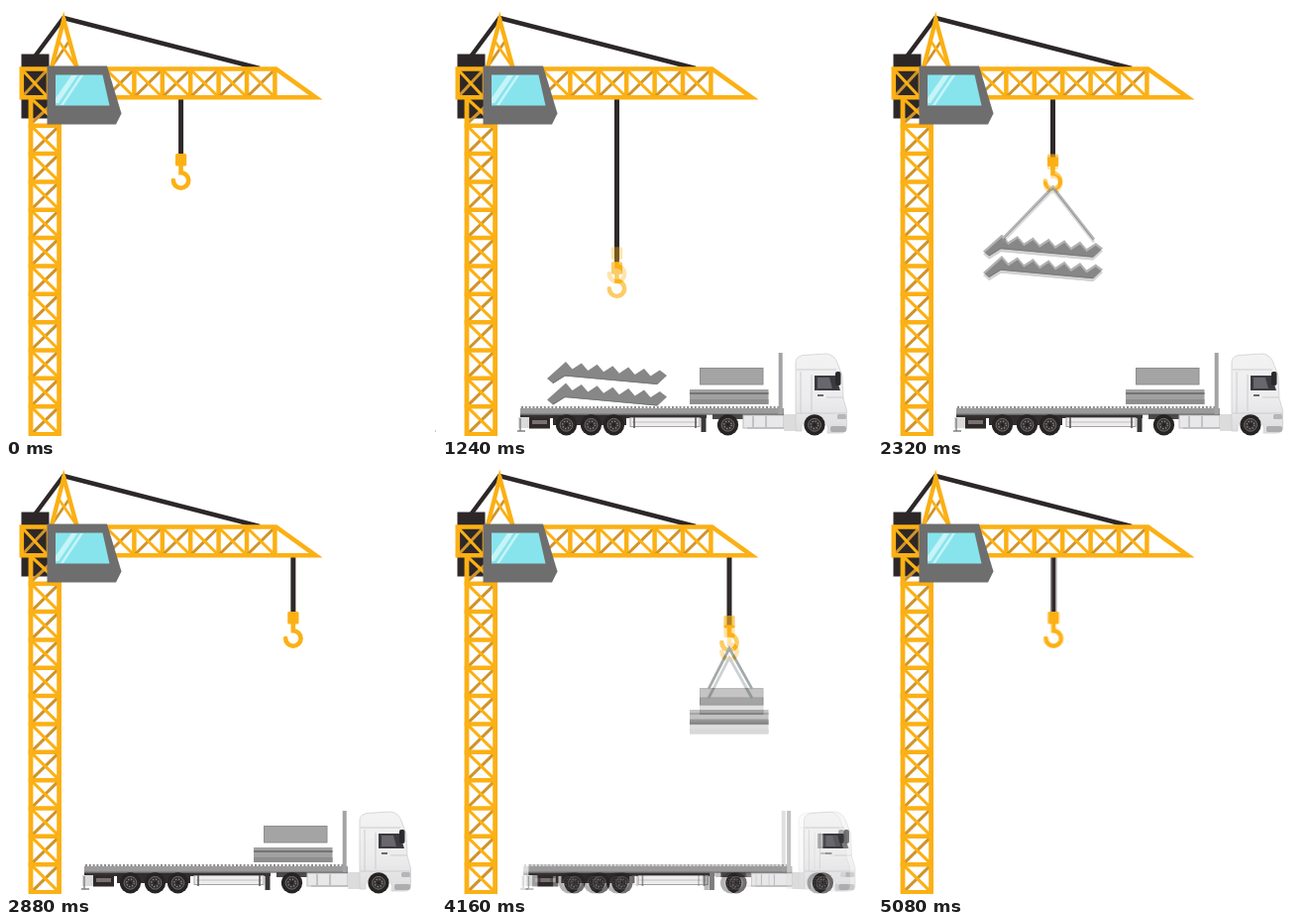
These frames come from a looping animation (434x434 px, 5.12 s). An HTML page:

```html
<!DOCTYPE html>
<html lang="en">
<head>
<meta charset="utf-8">
<title>Crane unloading a truck</title>
<style>
html, body { margin: 0; width: 100%; height: 100%; overflow: hidden; background: #fff; }
svg { display: block; width: 100vw; height: 100vh; }
#movers { isolation: isolate; }
#movers > g { mix-blend-mode: plus-lighter; }
</style>
</head>
<body>
<svg viewBox="0 0 434 434" xmlns="http://www.w3.org/2000/svg">
  <defs>
    <linearGradient id="paint" x2="0" y2="1">
      <stop offset="0" stop-color="#f3f3f4"/>
      <stop offset=".6" stop-color="#ebebec"/>
      <stop offset="1" stop-color="#dcdcde"/>
    </linearGradient>
    <g id="wheel">
      <circle r="10.6" fill="#242122"/>
      <circle r="6.4" fill="#363233" stroke="#777374" stroke-width=".9"/>
      <circle r="3.8" fill="none" stroke="#979394" stroke-width="1.2" stroke-dasharray="1.2 1.8"/>
      <circle r="1.7" fill="#242122"/>
    </g>
  </defs>
  <rect width="434" height="434" fill="#fff"/>
  <g id="movers"></g>
  <g id="crane"></g>
</svg>
<script>
const LOOP = 5120, ENTRY = 357, EXIT = 365, LOWEST = 180;
const YELLOW = '#fbb014', SHADE = '#d0942a', DARK = '#2d2728';
const $ = id => document.getElementById(id);

const line = (d, color, width, extra = '') =>
  `<path d="${d}" fill="none" stroke="${color}" stroke-width="${width}" ${extra}/>`;
const poly = (points, fill, extra = '') => `<polygon points="${points}" fill="${fill}" ${extra}/>`;
const rect = (x, y, w, h, fill, extra = '') =>
  `<rect x="${x}" y="${y}" width="${w}" height="${h}" fill="${fill}" ${extra}/>`;
const cross = (x1, y1, x2, y2) =>
  line(`M${x1} ${y2}L${x2} ${y1}`, SHADE, 3.1) + line(`M${x1} ${y1}L${x2} ${y2}`, YELLOW, 3.1);

function crane() {
  const parts = [
    rect(15.5, 48.5, 28, 65, DARK),
    line('M29 51L58 12L256 63', DARK, 4.4, 'stroke-linejoin="round"')
  ];
  // tower
  const step = 28.35;
  parts.push(cross(25, 93, 53, 119));
  for (let i = 0; i < 11; i++) {
    const y = 120.7 + i * step;
    parts.push(cross(25, y, 54, y + step), line(`M22.7 ${y}H56`, YELLOW, 4.5));
  }
  parts.push(line('M25 92V434M53.6 92V434M22.7 432.3H56', YELLOW, 4.8));
  // counter jib
  parts.push(cross(16, 64, 42, 92), line('M15.8 63.5H43V92.2H15.8Z', YELLOW, 4.6));
  // jib
  for (let i = 0; i < 6; i++) {
    const x = 101 + i * 28.4;
    parts.push(cross(x, 64, x + 28.4, 92), line(`M${x + 28.4} 63V93`, YELLOW, 4.5));
  }
  parts.push(line('M98 63.5H272.5L312.5 92.2H98', YELLOW, 4.6));
  // mast head
  parts.push(
    line('M64 35L47 60', SHADE, 2.8),
    line('M53 35L70 60', YELLOW, 2.8),
    line('M46 62L58.3 14L71.5 62', YELLOW, 4.4),
    poly('56,13 58.3,9.5 60.6,13 59.5,20 57,20', YELLOW)
  );
  // cab
  parts.push(
    poly('41.5,60.5 102,60.5 116.5,108.5 111,119.5 41.5,119.5', '#6e6e6e'),
    poly('50,69.5 97.5,69.5 104.5,100.5 50,100.5', '#87e4ed'),
    poly('66,70 72,70 53,98 50,98 50,93', '#c6f4f7'),
    poly('75,70 78,70 58,100 55,100', '#c6f4f7')
  );
  return parts.join('');
}

function truck() {
  const wheels = [125.5, 150.5, 173.5, 288.5, 376]
    .map(x => `<use href="#wheel" x="${x}" y="422.8"/>`).join('');
  return [
    // trailer
    rect(79, 412, 188, 4, '#343031'),
    rect(112, 413, 74, 10, '#2f2b2c'),
    rect(77, 415, 11, 11, '#dadada'),
    rect(88, 415.5, 21, 11, DARK),
    rect(91, 418, 15, 4, '#77706f'),
    line('M76 429H84M79 416V429', '#827e7e', 1.4),
    rect(190, 415.5, 70, 9, '#ededed', 'stroke="#a5a1a1"'),
    line('M192 420H258', '#c2bfbf', 1),
    line('M194 415V426M256 415V426', '#595556', 1.6),
    rect(261.5, 412, 5, 18, '#393536'),
    rect(79, 406, 266, 6.4, '#9b9b9b'),
    line('M79 412H345', '#706d6e', 1.2),
    line('M80 405H340', '#8b8b8b', 2.2, 'stroke-dasharray="2 1.8"'),
    rect(339.7, 350, 4, 62, '#a2a2a4'),
    // tractor
    rect(273, 412, 86, 5, '#4a4647'),
    rect(304, 413, 41, 13, '#e8e8e9', 'stroke="#bbb9bb"'),
    line('M308 426H345M314 414V425M327 414V425', '#aaa7a9', 1.2),
    rect(345, 412, 14, 17, '#dcdbdd'),
    '<path d="M357 360Q357 354 364 352.5L388 351Q396 352 399 360L404 373L405 396L408.5 408V426Q408 431 402 431H389A13 12 0 0 0 363 424V429H357Z" fill="url(#paint)" stroke="#cfced0" stroke-width=".8"/>',
    line('M358 367H398M362 369V411M373 372V409M358 411H408M388 395H405', '#cccbce', 1),
    poly('376,373 397,373 402,388 376,388', '#3a393d'),
    poly('379,375 391,375 394,386 379,386', '#66666c'),
    rect(397, 369, 5.5, 14, '#29272a', 'rx="2"'),
    rect(379, 392, 6, 2, '#69676b'),
    rect(399, 412, 9, 5, '#b4b5ba', 'rx="1.5"'),
    rect(392, 424, 16, 6, '#adabaf', 'rx="2"'),
    wheels
  ].join('');
}

function stairs(dy) {
  const pts = [[106, 376]];
  for (let i = 0; i < 7; i++) {
    const x = 125 + i * 15.8, y = 359 + i * 1.4;
    pts.push([x, y]);
    if (i < 6) pts.push([x + 6.5, y + 7.5]);
  }
  pts.push([227, 373], [217.5, 382], [124, 373.5], [112, 381]);
  return poly(pts.map(([x, y]) => `${x},${y + dy}`).join(' '), '#868686') +
    line(`M112 ${380.5 + dy}L124 ${373 + dy}L217 ${381.5 + dy}`, '#747677', 1.2);
}

const slabs = () =>
  rect(260.5, 365.5, 63.5, 16.5, '#a3a3a3', 'stroke="#8d8d8d"') +
  rect(250, 387, 79.5, 15, '#a0a0a0') +
  rect(250, 390, 79.5, 2, '#727374') +
  rect(250, 397, 79.5, 5, '#8d8d8e');

const hook =
  rect(-5.6, 149, 11.2, 12.5, YELLOW, 'rx="1.5"') +
  line('M0 160V168.3A7.7 7.7 0 1 1 -7.7 176', YELLOW, 4.6, 'stroke-linecap="round"');

// Per load: hook lowers from..to, picks up at pick, reaches the top, fades until gone.
// reach is the hook depth at which the slings are taut.
const LOADS = [
  { name: 'stairs', from: 740, to: 1640, pick: 1750, top: 2350, gone: 2470,
    reach: 129, left: 125, right: 218, y: 364, color: '#929394' },
  { name: 'slabs', from: 3170, to: 3610, pick: 3800, top: 4210, gone: 4400,
    reach: 143, left: 269, right: 313, y: 366, color: '#717b7b' }
];

// Each layer is one exposure of everything that moves.
function makeLayer(weight) {
  const root = document.createElementNS('http://www.w3.org/2000/svg', 'g');
  root.setAttribute('opacity', weight);
  root.innerHTML =
    `<g class="truck">${truck()}</g>` +
    `<g class="stairs">${stairs(0)}${stairs(21.5)}</g><g class="slabs">${slabs()}</g>` +
    line('', DARK, 5, 'class="rope"') + `<g class="hook">${hook}</g>` +
    LOADS.map(l => line('', l.color, 2.8, `class="${l.name}Sling"`)).join('');
  $('movers').append(root);
  const el = {};
  for (const node of root.querySelectorAll('[class]')) el[node.getAttribute('class')] = node;
  return el;
}

function ease(t, from, to) {
  const p = Math.min(1, Math.max(0, (t - from) / (to - from)));
  return p < .5 ? 2 * p * p : 1 - 2 * (1 - p) * (1 - p);
}
const move = (el, x, y) => el.setAttribute('transform', `translate(${x.toFixed(2)} ${y.toFixed(2)})`);

const hookDepth = (load, t) => t < load.pick
  ? LOWEST * ease(t, load.from, load.to)
  : load.reach * (1 - ease(t, load.pick, load.top));

function pose(el, time) {
  const t = (time + LOOP) % LOOP;
  const entry = ENTRY * (1 - ease(t, 0, 1120));
  const x = 176.5 + 113.5 * (ease(t, 2390, 2860) - ease(t, 4410, 5100));
  const drop = LOADS.reduce((sum, load) => sum + hookDepth(load, t), 0);

  move(el.truck, entry + EXIT * ease(t, 4060, 5000), 0);
  move(el.hook, x, drop);
  el.rope.setAttribute('d', `M${x} 92V${150 + drop}`);

  for (const load of LOADS) {
    const lift = load.reach * ease(t, load.pick, load.top);
    const body = el[load.name], sling = el[load.name + 'Sling'];
    const opacity = 1 - ease(t, load.top, load.gone);
    const y = load.y - lift;
    move(body, entry, -lift);
    body.setAttribute('opacity', opacity);
    sling.setAttribute('opacity', t < load.pick ? 0 : opacity);
    sling.setAttribute('d', `M${load.left} ${y}L${x} ${182 + drop}L${load.right} ${y}`);
  }
}

$('crane').innerHTML = crane();
const layers = [[40, .35], [0, .65]].map(([lag, weight]) => ({ lag, el: makeLayer(weight) }));

const start = performance.now();
function frame() {
  const t = (performance.now() - start) % LOOP;
  for (const { lag, el } of layers) pose(el, t - lag);
  requestAnimationFrame(frame);
}
frame();
</script>
</body>
</html>
```
